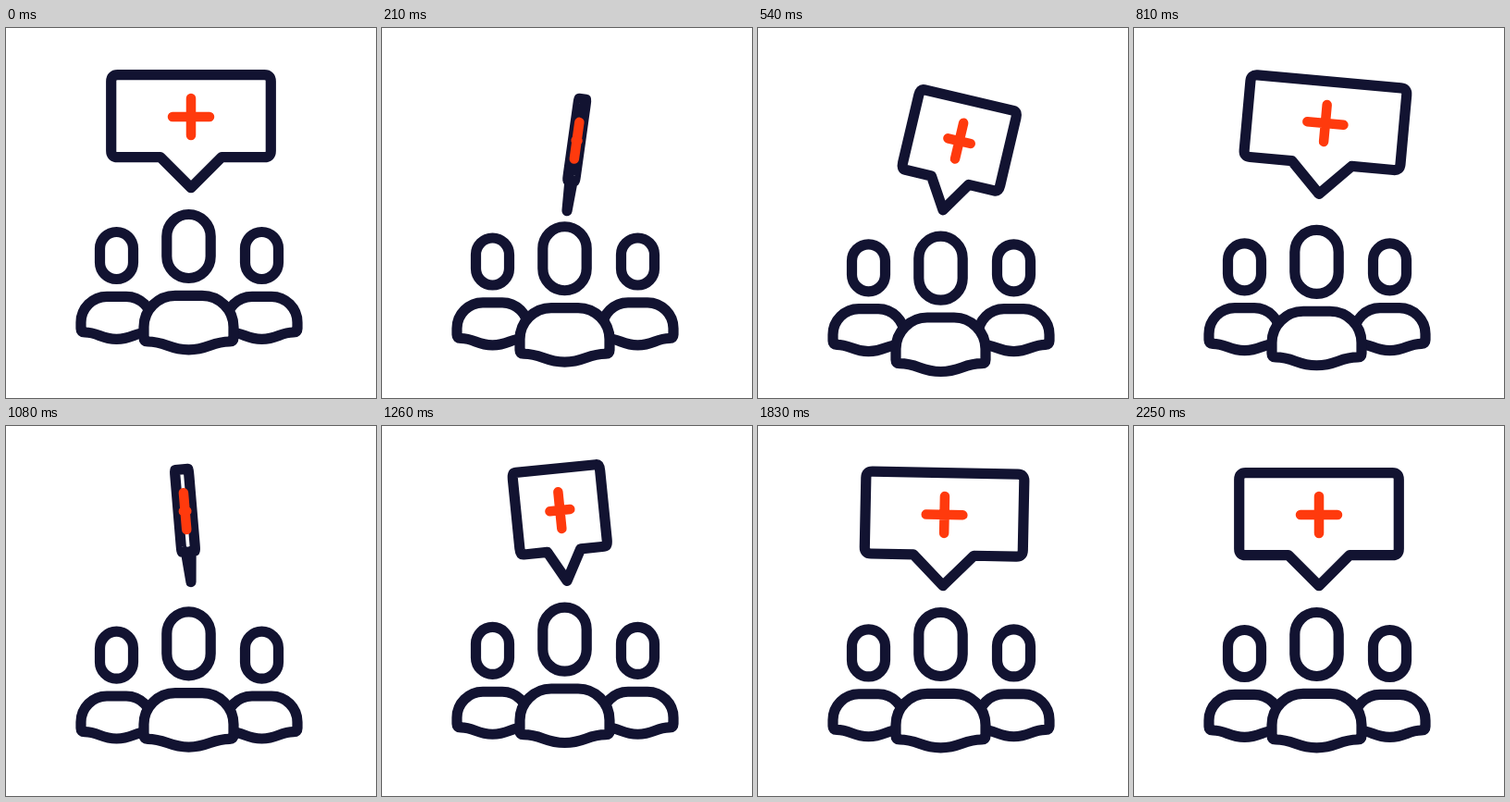
These frames come from a looping animation (400x400 px, 4.34 s). An HTML page with a canvas:

```html
<!DOCTYPE html>
<html lang="en">
<head>
<meta charset="utf-8">
<title>Medical consultation</title>
<style>
html, body { margin: 0; width: 100%; height: 100%; overflow: hidden; background: #fff; }
canvas { display: block; width: 400px; height: 400px; }
</style>
</head>
<body>
<canvas id="stage"></canvas>
<script>
const LOOP = 4340, STEP = 30, END = 2250;
const INK = '#121331', RED = '#ff3a0d', LINE = 11.2;
const MID = 198, RAD = Math.PI / 180;

const canvas = document.getElementById('stage');
const ctx = canvas.getContext('2d');
const ratio = window.devicePixelRatio || 1;
canvas.width = canvas.height = 400 * ratio;
ctx.lineCap = ctx.lineJoin = 'round';

// Eases out to a peak, then swings back and forth until it rests at END
function sway({ amp, peak, rise, half, decay }) {
  return t => t < peak
    ? amp * (1 - (1 - t / peak) ** rise)
    : amp * Math.cos(Math.PI * (t - peak) / half) * ((END - t) / (END - peak)) ** decay;
}

const bubbleY = sway({ amp: 27.5, peak: 470, rise: 4, half: 940, decay: 2.6 });
const tilt = sway({ amp: 13.3, peak: 575, rise: 2, half: 700, decay: 1.6 });
const middleY = sway({ amp: 24.6, peak: 680, rise: 2.1, half: 770, decay: 2.6 });
const sideY = sway({ amp: 14.7, peak: 720, rise: 1.7, half: 820, decay: 1.9 });

// One full turn at constant speed, then half a turn running out
function spin(t) {
  const from = 10, turn = 825, d = t - from - turn;
  if (d < 0) return 360 * Math.max(0, t - from) / turn;
  return 540 - 180 * (1 - d / 2500) ** 6.2;
}

function outline(path) {
  ctx.fillStyle = '#fff';
  ctx.strokeStyle = INK;
  ctx.lineWidth = LINE;
  ctx.fill(path);
  ctx.stroke(path);
}

function head(x, top, bottom, r) {
  const p = new Path2D();
  p.arc(x, top + r, r, Math.PI, 0);
  p.arc(x, bottom - r, r, 0, Math.PI);
  p.closePath();
  return p;
}

// Shoulders: half width w, shoulder radius r, wavy lower edge
function torso(x, w, top, r, base, dip) {
  const p = new Path2D(), k = r * 0.45, c = 4, l = x - w, q = x + w;
  p.moveTo(l, base - c);
  p.lineTo(l, top + r);
  p.bezierCurveTo(l, top + k, l + k, top, l + r, top);
  p.lineTo(q - r, top);
  p.bezierCurveTo(q - k, top, q, top + k, q, top + r);
  p.lineTo(q, base - c);
  p.quadraticCurveTo(q, base, q - c, base);
  p.bezierCurveTo(q - w * 0.5, base, x + w * 0.45, dip, x, dip);
  p.bezierCurveTo(x - w * 0.45, dip, l + w * 0.5, base, l + c, base);
  p.quadraticCurveTo(l, base, l, base - c);
  p.closePath();
  return p;
}

function person(parts, y) {
  ctx.save();
  ctx.translate(0, y);
  parts.forEach(outline);
  ctx.restore();
}

const side = x => [head(x, 220.5, 271.5, 18), torso(x, 38.5, 290.3, 28, 329, 336.3)];
const left = side(MID - 78.5), right = side(MID + 78.5);
const middle = [head(MID - 0.5, 201.5, 270.5, 23.7), torso(MID - 0.5, 48.5, 289.3, 34, 339, 347.8)];

// Spins on its tip; only the geometry narrows, the line keeps its weight
function bubble(y, angle, s) {
  const w = 86.3, tail = 33, r = 7, top = -122, low = -33, plus = -76.7, arm = 20;
  const line = (x, y) => ctx.lineTo(x * s, y);
  const round = (cx, cy, x, y) => ctx.quadraticCurveTo(cx * s, cy, x * s, y);
  ctx.save();
  ctx.translate(200, 172.7 + y);
  ctx.rotate(angle);
  ctx.beginPath();
  line(0, 0);
  line(-tail, low);
  line(r - w, low);
  round(-w, low, -w, low - r);
  line(-w, top + r);
  round(-w, top, r - w, top);
  line(w - r, top);
  round(w, top, w, top + r);
  line(w, low - r);
  round(w, low, w - r, low);
  line(tail, low);
  ctx.closePath();
  ctx.strokeStyle = INK;
  ctx.lineWidth = LINE;
  ctx.stroke();

  ctx.beginPath();
  ctx.moveTo(-arm * s, plus);
  line(arm, plus);
  ctx.moveTo(0, plus - arm);
  line(0, plus + arm);
  ctx.strokeStyle = RED;
  ctx.lineWidth = 10.5;
  ctx.stroke();
  ctx.restore();
}

function draw(t) {
  ctx.setTransform(ratio, 0, 0, ratio, 0, 0);
  ctx.fillStyle = '#fff';
  ctx.fillRect(0, 0, 400, 400);
  person(left, sideY(t));
  person(right, sideY(t));
  person(middle, middleY(t));
  bubble(bubbleY(t), tilt(t) * RAD, Math.cos(spin(t) * RAD));
}

const start = performance.now();
function tick() {
  const t = (performance.now() - start) % LOOP;
  draw(Math.min(END, Math.floor(t / STEP) * STEP));
  requestAnimationFrame(tick);
}
tick();
</script>
</body>
</html>
```
